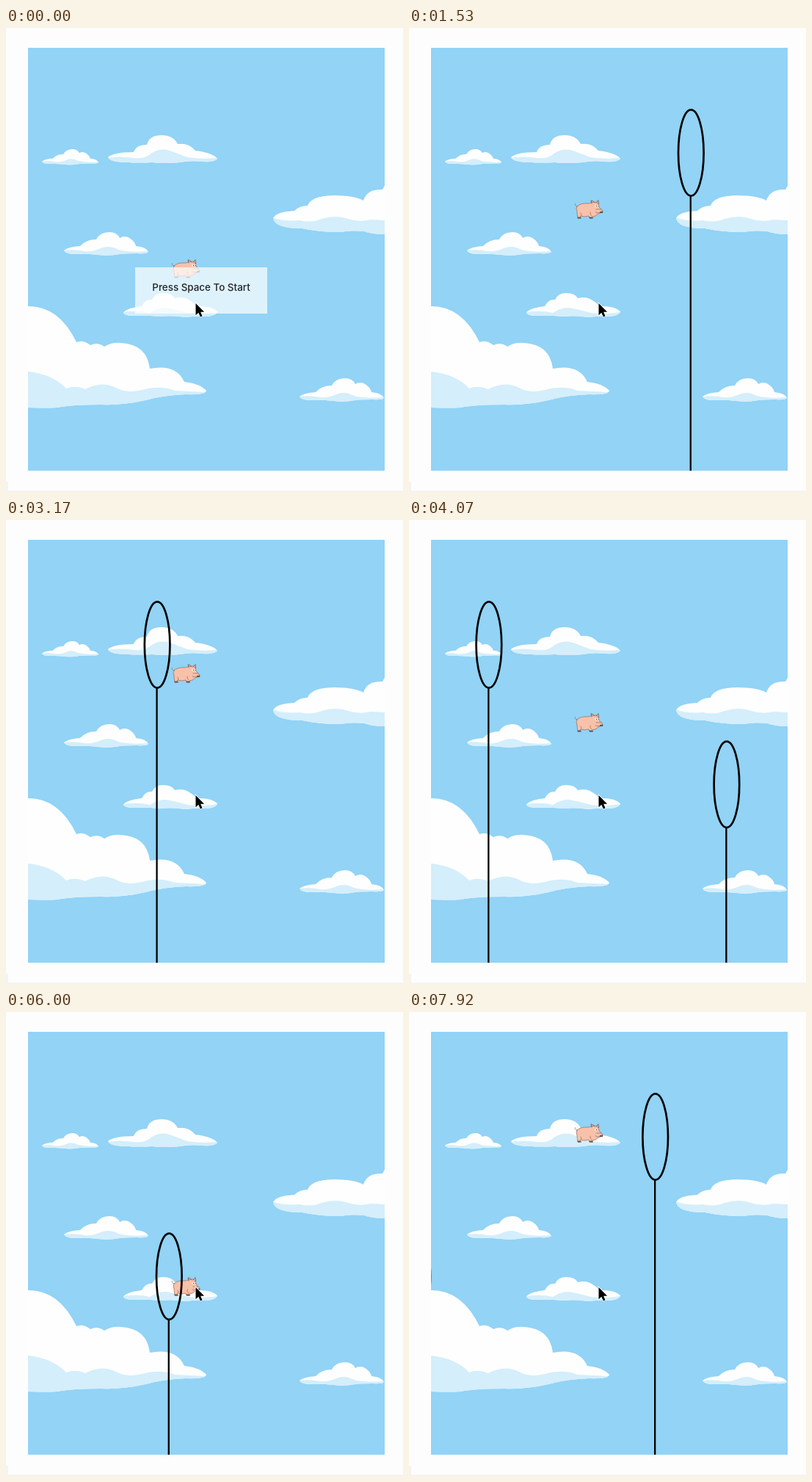
These frames come from a looping animation (541x632 px, 8 s). An HTML page with a canvas:

```html
<!DOCTYPE html>
<html lang="en">
<head>
<meta charset="utf-8">
<title>Flying pig</title>
<style>
  html, body { margin: 0; width: 100%; height: 100%; overflow: hidden; background: #fdfdfd; }
  canvas { display: block; width: 541px; height: 632px; }
</style>
</head>
<body>
<canvas id="stage" width="541" height="632"></canvas>
<script>
const ctx = document.getElementById('stage').getContext('2d');
const LOOP = 8000;
const SKY = { x: 30, y: 27, w: 486, h: 576 };

// Game ticks: [tick, time in ms]
const TICKS = [[0, 500], [2, 790], [7, 1530], [8, 1680], [12, 2270], [15, 2720],
  [16, 2870], [18, 3170], [22, 3770], [23, 3920], [29, 4820], [30, 4960],
  [31, 5110], [37, 6000], [38, 6150], [39, 6300], [46, 7330], [47, 7480],
  [50, 7920], [51, 8070]];

// Pig path: [tick, top, arc height up to the next entry]
const HOPS = [[-1, 315, 5], [2, 279, 7], [7, 234, 7], [12, 188, 12], [18, 196, 48],
  [29, 406, 4], [33, 394, 6], [37, 361, 6], [41, 300, 7], [45, 235, 7], [50, 152, 0], [51, 152, 0]];

const HOOP = { start: 497, step: 16.2, every: 20, rx: 17.3, ry: 58.6, levels: [170, 360.3, 170] };

const cloud = (outline, shade) => ({
  outline: new Path2D(outline),
  shade: new Path2D(shade + 'V620H0Z')
});

const small = cloud(
  'M0 25Q6 20 22 19Q30 10 44 10Q49 0 62 0Q72 0 76 8Q84 3 92 10Q97 14 98 19Q112 20 115 27' +
  'Q112 30 100 29Q84 29 76 30Q62 33 46 31Q30 29 16 30Q2 30 0 25Z',
  'M0 25Q14 23 28 26Q40 27 50 22Q62 17 74 24Q90 28 115 26');
const wide = cloud(
  'M0 30Q8 23 35 23Q38 13 53 13Q56 0 73 0Q89 0 95 12Q110 10 119 21Q143 24 149 32' +
  'Q146 37 128 36Q112 34 98 37Q75 39 60 37Q40 38 28 37Q2 37 0 30Z',
  'M0 31Q15 28 35 31Q50 33 60 24Q72 17 84 21Q98 26 108 30Q125 33 149 31');
const middle = cloud(
  'M0 26Q6 20 25 18Q30 8 39 9Q43 0 54 0Q66 0 70 7Q82 4 90 10Q96 13 99 18Q120 17 128 25' +
  'Q127 31 112 32Q100 31 84 33Q68 30 50 32Q30 30 15 31Q0 31 0 26Z',
  'M0 26Q20 23 36 27Q48 19 58 20Q74 23 84 26Q100 30 128 26');
const right = cloud(
  'M364 259Q368 250 393 249Q400 242 411 242Q416 228 448 228Q474 228 487 235Q492 219 513 220' +
  'L517 213V281Q500 281 488 277Q470 275 456 278Q425 278 404 273Q366 273 364 259Z',
  'M364 258Q378 264 400 262Q416 266 430 260Q450 254 466 260Q482 265 497 261L517 262');
const big = cloud(
  'M29 379Q72 378 96 428Q105 424 115 432Q125 427 134 434Q143 428 157 429Q192 431 196 464' +
  'Q232 457 243 482Q264 484 273 494Q272 500 245 499Q215 500 190 507Q160 514 130 513' +
  'Q90 513 70 517Q50 518 29 517Z',
  'M29 468Q63 471 82 491Q94 486 108 492Q130 480 150 490Q163 498 185 493Q211 486 230 494L274 496');

const CLOUDS = [[small, 49, 165, .67], [wide, 139, 146, 1], [small, 79, 278, 1],
  [middle, 160, 361, 1], [small, 400, 477, 1], [right, 0, 0, 1], [big, 0, 0, 1]];

const pigBody = new Path2D(
  'M4 9Q9 4 20 5Q24 3 29 3Q34 4 34 10L39 15Q38 18 33 19Q29 23 25 23L25 25H21L20 22' +
  'Q14 24 9 22L8 25H5Q4 19 4 16Q2 12 4 9Z');
const pigEars = new Path2D('M24 5L23 .8Q26 1 28 4M30 4L33 .6L33.5 6');
const pigLines = new Path2D('M4 9Q0 8 1.5 5.5M29 17Q33 19 36 17M30 13L37 13M22 17Q21 20 24 22M9 18Q11 21 9 22');
const pigHooves = new Path2D('M4.5 23.5H9L10 25.5H5ZM20.5 23.5H25L26 25.6H21ZM35 16L39.5 15.5L39 18L35 18Z');
const arrow = new Path2D('M0 0V16.3L3.8 12.8L6.3 18.4L9 17.2L6.6 11.8H11.6Z');

function span(list, value, column) {
  let i = 0;
  while (i < list.length - 2 && value >= list[i + 1][column]) i++;
  const a = list[i], b = list[i + 1];
  return { a, b, u: (value - a[column]) / (b[column] - a[column]) };
}

function tickAt(t) {
  if (t < TICKS[0][1]) return -1;
  const { a, b, u } = span(TICKS, t, 1);
  return Math.floor(a[0] + (b[0] - a[0]) * u + 1e-6);
}

function pigTop(tick) {
  const { a, b, u } = span(HOPS, tick, 0);
  return a[1] + (b[1] - a[1]) * u - 4 * a[2] * u * (1 - u);
}

function rect(color, x, y, w, h) {
  ctx.fillStyle = color;
  ctx.fillRect(x, y, w, h);
}

function fill(path, color) {
  ctx.fillStyle = color;
  ctx.fill(path);
}

function stroke(path, color, width) {
  ctx.strokeStyle = color;
  ctx.lineWidth = width;
  ctx.stroke(path);
}

function drawCloud([shape, x, y, scale]) {
  ctx.save();
  ctx.translate(x, y);
  ctx.scale(scale, scale);
  fill(shape.outline, '#fefefe');
  ctx.clip(shape.outline);
  fill(shape.shade, '#d4eefb');
  ctx.restore();
}

function drawPig(y) {
  ctx.save();
  ctx.translate(225, y);
  ctx.lineJoin = ctx.lineCap = 'round';
  fill(pigEars, '#f3b39c');
  fill(pigBody, '#f8c1aa');
  stroke(pigBody, '#8f6a5c', .7);
  stroke(pigEars, '#6d5850', .8);
  stroke(pigLines, '#8f6a5c', .7);
  fill(pigHooves, '#625451');
  ctx.beginPath();
  ctx.arc(29.5, 8.5, 1.6, 0, 7);
  ctx.arc(33, 8.5, 1.3, 0, 7);
  ctx.fillStyle = '#fbe9df';
  ctx.fill();
  rect('#443c3a', 30, 8, 1, 1);
  rect('#443c3a', 33, 8, 1, 1);
  ctx.restore();
}

function drawHoop(x, y) {
  ctx.strokeStyle = '#000';
  ctx.lineWidth = 2.7;
  ctx.beginPath();
  ctx.ellipse(x + .7, y, HOOP.rx, HOOP.ry, 0, 0, Math.PI * 2);
  ctx.stroke();
  rect('#000', x - 1, y + HOOP.ry, 2.3, 603 - y - HOOP.ry);
}

function drawHoops(tick) {
  HOOP.levels.forEach((y, i) => {
    const age = tick - i * HOOP.every;
    if (age >= 0 && age <= 30) drawHoop(HOOP.start - HOOP.step * age, y);
  });
}

function drawPrompt() {
  rect('rgba(255,255,255,.7)', 176, 326, 180, 63);
  ctx.fillStyle = '#212529';
  ctx.font = '500 13.4px Inter, sans-serif';
  ctx.textAlign = 'center';
  ctx.fillText('Press Space To Start', 266, 358);
}

function drawCursor() {
  ctx.save();
  ctx.translate(258.5, 375);
  ctx.lineJoin = 'miter';
  stroke(arrow, '#fff', 1.6);
  fill(arrow, '#000');
  ctx.restore();
}

function draw(t) {
  const tick = tickAt(t);
  rect('#fdfdfd', 0, 0, 541, 632);
  rect('#f4f4f4', 0, 618, 3, 12);
  rect('#f4f4f4', 0, 630, 541, 2);
  ctx.save();
  ctx.beginPath();
  ctx.rect(SKY.x, SKY.y, SKY.w, SKY.h);
  ctx.clip();
  rect('#92d3f6', SKY.x, SKY.y, SKY.w, SKY.h);
  CLOUDS.forEach(drawCloud);
  drawPig(pigTop(tick));
  drawHoops(tick);
  if (tick < 0) drawPrompt();
  ctx.restore();
  drawCursor();
}

const begin = performance.now();
function loop() {
  draw((performance.now() - begin) % LOOP);
  requestAnimationFrame(loop);
}
loop();
</script>
</body>
</html>
```
